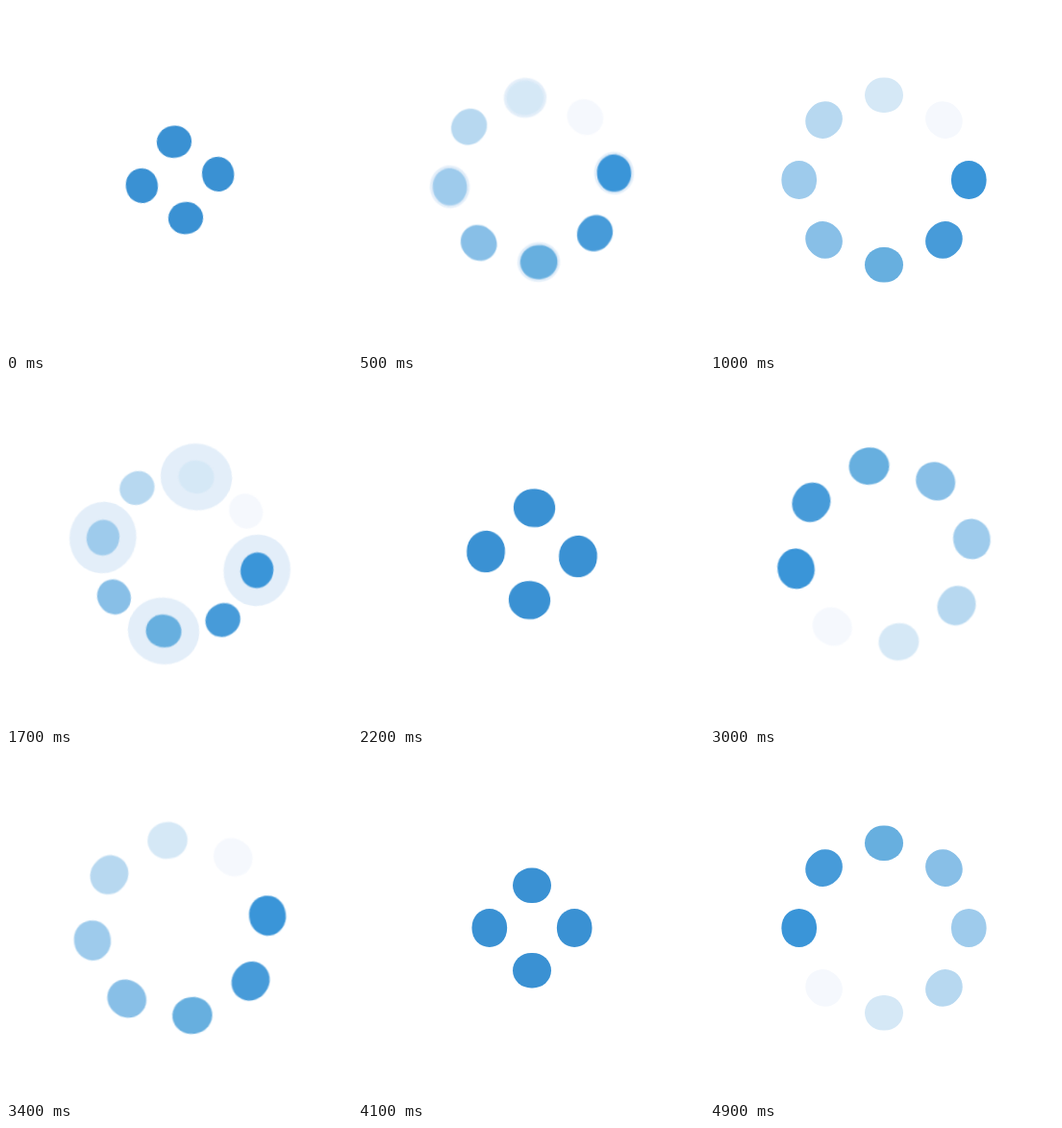
Animation of 360 by 360 pixels, one loop 5 s. Source, as an HTML page without scripts:

```html
<!DOCTYPE html>
<html lang="en">
<head>
<meta charset="utf-8">
<title>Dot loader</title>
<style>
  html, body { margin: 0; width: 100%; height: 100%; overflow: hidden; background: #fff; }
  svg { display: block; width: 100vw; height: 100vh; }

  .pose { animation: pose 5s linear infinite; }
  .inner { fill: #3a91d3; animation: inner 5s step-end infinite; }
  .ring { animation: ring 5s step-end infinite; }
  .flip { animation: flip 5s step-end infinite; }
  .halos { fill: #e3eef9; animation: halos 5s step-end infinite; }
  .halo { animation: grow 5s linear infinite; }

  @keyframes pose {
    0% { transform: rotate(-8.6deg) scale(.907); }
    4% { transform: rotate(-12deg) scale(.927); }
    14%, 25% { transform: rotate(0deg) scale(1); }
    34% { transform: rotate(12deg) scale(.927); }
    42% { transform: rotate(0deg) scale(1.1); }
    48% { transform: rotate(9deg) scale(1.06); }
    52% { transform: rotate(9.6deg) scale(1.053); }
    56% { transform: rotate(0deg) scale(1.1); }
    60% { transform: rotate(-9.6deg) scale(1.05); }
    68% { transform: rotate(-8.1deg) scale(1.042); }
    72%, 84% { transform: rotate(0deg) scale(1); }
    90% { transform: rotate(8deg) scale(1.042); }
    96%, 100% { transform: rotate(0deg) scale(1); }
  }
  @keyframes inner {
    0% { opacity: 1; }
    3% { opacity: 0; }
    35% { opacity: 1; }
    49% { opacity: 0; }
    77% { opacity: 1; }
    87%, 100% { opacity: 0; }
  }
  @keyframes ring {
    0% { opacity: 0; }
    3% { opacity: 1; }
    35% { opacity: 0; }
    49% { opacity: 1; }
    77% { opacity: 0; }
    87%, 100% { opacity: 1; }
  }
  @keyframes flip {
    0% { transform: rotate(0deg); }
    49% { transform: rotate(180deg); }
    61% { transform: rotate(0deg); }
    87%, 100% { transform: rotate(180deg); }
  }
  @keyframes halos {
    0% { opacity: 0; }
    3% { opacity: 1; }
    11% { opacity: 0; }
    27% { opacity: 1; }
    35%, 100% { opacity: 0; }
  }
  @keyframes grow {
    0%, 4% { transform: scale(1); }
    11%, 27% { transform: scale(.5); }
    34%, 100% { transform: scale(1); }
  }
</style>
</head>
<body>
<svg viewBox="0 0 360 360">
  <defs>
    <rect id="dot" x="-18.3" y="-20" width="36.6" height="40" rx="18.3" ry="19.2"/>
    <use id="near" href="#dot" x="44.2"/>
    <use id="far" href="#dot" x="88.3"/>
  </defs>
  <g transform="translate(181 181)">
    <g class="pose">
      <g class="inner">
        <use href="#near"/>
        <use href="#near" transform="rotate(90)"/>
        <use href="#near" transform="rotate(180)"/>
        <use href="#near" transform="rotate(270)"/>
      </g>
      <g class="halos">
        <g transform="translate(88.3)"><ellipse class="halo" rx="37.4" ry="40.2"/></g>
        <g transform="rotate(90) translate(88.3)"><ellipse class="halo" rx="37.4" ry="40.2"/></g>
        <g transform="rotate(180) translate(88.3)"><ellipse class="halo" rx="37.4" ry="40.2"/></g>
        <g transform="rotate(270) translate(88.3)"><ellipse class="halo" rx="37.4" ry="40.2"/></g>
      </g>
      <g class="ring">
        <g class="flip">
          <use href="#far" fill="#3a95d8"/>
          <use href="#far" fill="#479bd9" transform="rotate(45)"/>
          <use href="#far" fill="#67afdf" transform="rotate(90)"/>
          <use href="#far" fill="#88bfe7" transform="rotate(135)"/>
          <use href="#far" fill="#9ecbec" transform="rotate(180)"/>
          <use href="#far" fill="#b7d8f0" transform="rotate(225)"/>
          <use href="#far" fill="#d5e8f6" transform="rotate(270)"/>
          <use href="#far" fill="#f5f8fd" transform="rotate(315)"/>
        </g>
      </g>
    </g>
  </g>
</svg>
</body>
</html>
```
